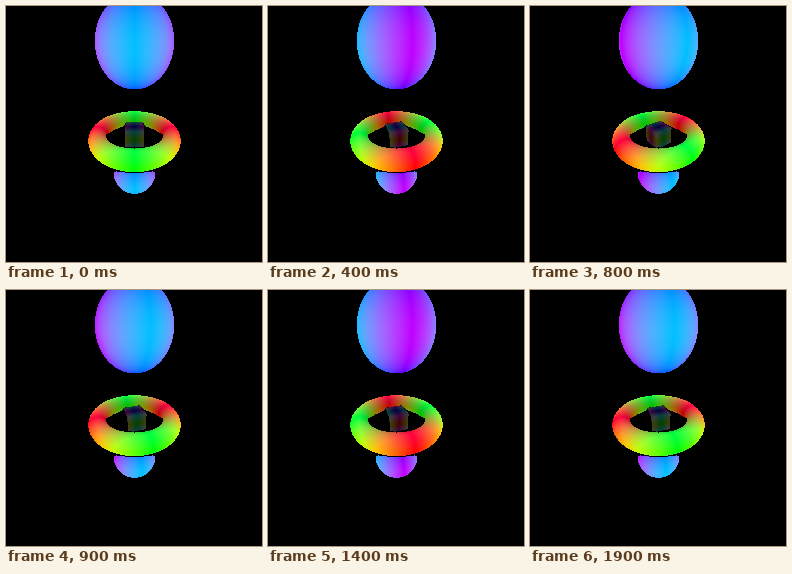
Recreate the animation shown at these times as an HTML page with a canvas. Size 256x256 px, loop 2 s.

```html
<!DOCTYPE html>
<html lang="en">
<head>
<meta charset="utf-8">
<title>Turning solids</title>
<style>
  html, body { margin: 0; width: 100%; height: 100%; overflow: hidden; background: #000; }
  canvas { display: block; }
</style>
</head>
<body>
<canvas id="stage" width="256" height="256"></canvas>
<script>
const SIZE = 256, HALF = SIZE / 2;
const STEP_MS = 100, STEPS = 20;
const EYE_Y = -3, EYE_Z = 2, EYE_DIST = Math.hypot(EYE_Y, EYE_Z);
// The short march leaves out rays that only graze a solid, which trims its rim.
const FAR = 8, HIT = 0.001, MAX_MARCH = 20;
// Part of the stage that can contain a solid
const AREA = { left: 80, top: 0, right: 178, bottom: 190 };

const ctx = document.getElementById("stage").getContext("2d");
const image = ctx.createImageData(SIZE, SIZE);

const length3 = (x, y, z) => Math.sqrt(x * x + y * y + z * z);

const sphere = (x, y, z, height) => length3(x, y, z - height) - 0.75;

function torus(x, y, z) {
  const ring = Math.sqrt(x * x + y * y) - 1;
  return Math.sqrt(ring * ring + z * z) - 0.25;
}

function cube(x, y, z) {
  const dx = Math.abs(x) - 0.25, dy = Math.abs(y) - 0.25, dz = Math.abs(z) - 0.25;
  return length3(Math.max(dx, 0), Math.max(dy, 0), Math.max(dz, 0))
    + Math.min(Math.max(dx, dy, dz), 0);
}

const scene = (x, y, z) => Math.min(
  sphere(x, y, z, 2), sphere(x, y, z, -1.5), torus(x, y, z), cube(x, y, z));

// The solids stay still in their own space while the eye circles them.
function render(angle) {
  const cos = Math.cos(angle), sin = Math.sin(angle);
  const eyeX = -EYE_Y * sin, eyeY = EYE_Y * cos;
  image.data.fill(0);

  for (let py = AREA.top; py < AREA.bottom; py++) {
    for (let px = AREA.left; px < AREA.right; px++) {
      const u = (px - HALF) / HALF, v = (HALF - py) / HALF;
      const len = length3(u, v, 1);
      const rayX = u / len;
      const rayY = (-EYE_Y + EYE_Z * v) / EYE_DIST / len;
      const rayZ = (-EYE_Z - EYE_Y * v) / EYE_DIST / len;
      const dirX = rayX * cos - rayY * sin, dirY = rayX * sin + rayY * cos;

      for (let t = 0, i = 0; t < FAR && i < MAX_MARCH; i++) {
        const x = eyeX + dirX * t, y = eyeY + dirY * t, z = EYE_Z + rayZ * t;
        const distance = scene(x, y, z);
        if (distance < HIT) {
          // Colour is the absolute position in the solids' space.
          const at = (py * SIZE + px) * 4;
          image.data[at] = Math.abs(x) * 255;
          image.data[at + 1] = Math.abs(y) * 255;
          image.data[at + 2] = Math.abs(z) * 255;
          image.data[at + 3] = 255;
          break;
        }
        t += distance;
      }
    }
  }
  ctx.putImageData(image, 0, 0);
}

let shown = -1;
function frame() {
  const step = Math.floor(performance.now() / STEP_MS) % STEPS;
  if (step !== shown) {
    shown = step;
    render(step / STEPS * 2 * Math.PI);
  }
  requestAnimationFrame(frame);
}
frame();
</script>
</body>
</html>
```
